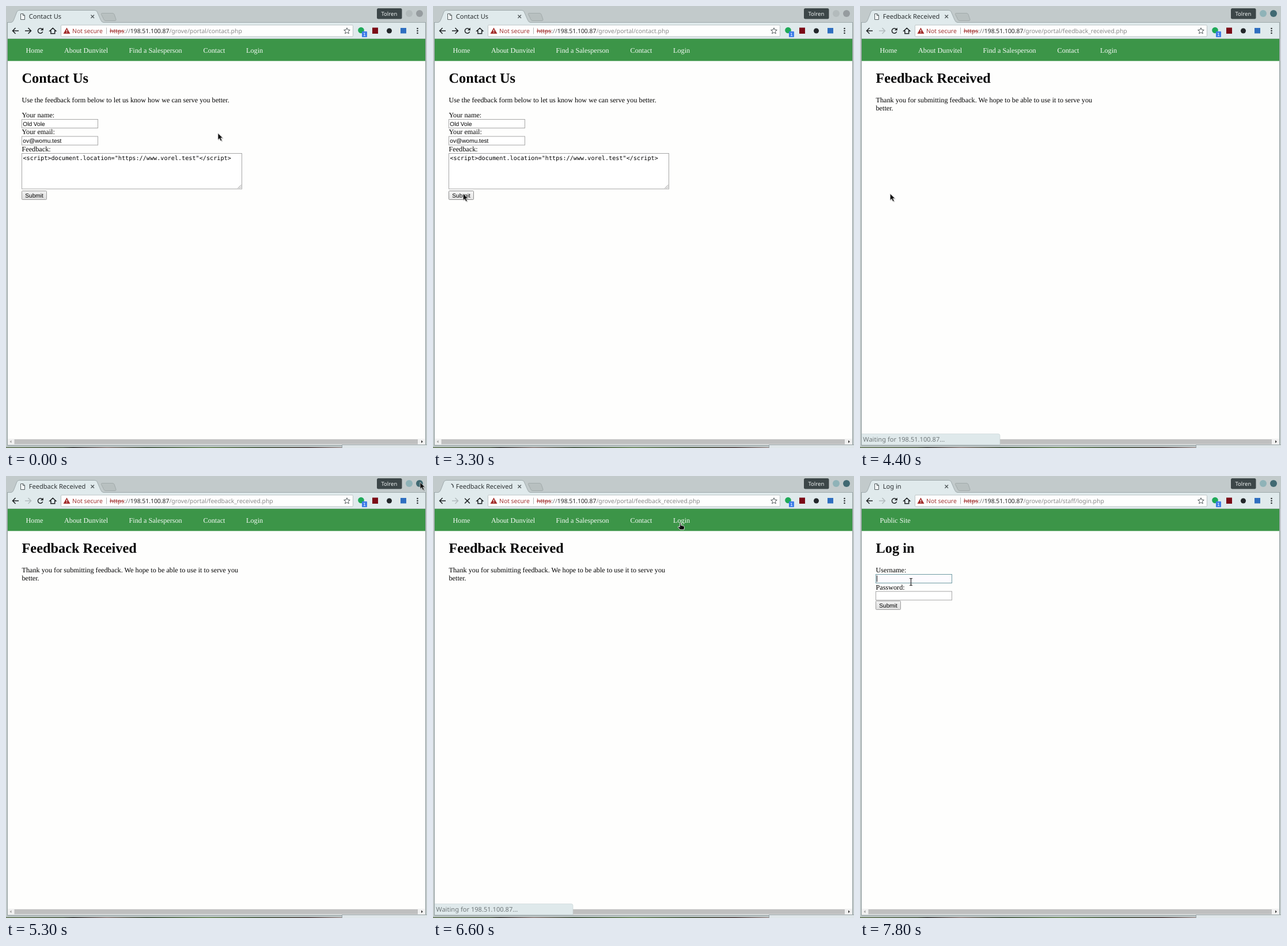
An HTML page for the animation above (8 s loop, 731 by 766 pixels).

```html
<!DOCTYPE html>
<html lang="en">
<head>
<meta charset="utf-8">
<title>Contact form</title>
<style>
  html, body { margin: 0; width: 100%; height: 100%; overflow: hidden; background: #fefefd; }
  svg { display: block; width: 100%; height: 100%; }
  text { white-space: pre; text-rendering: geometricPrecision; }
  .ui { font: 11.1px "Noto Sans", sans-serif; fill: #2b3032; }
  .bar { font-size: 10.38px; }
  .serif { font: 12.21px "Liberation Serif", serif; fill: #000; }
  .nav { fill: #f6faf6; }
  .h1 { font-size: 24.33px; font-weight: bold; }
  .field { font: 10.14px "Liberation Sans", sans-serif; fill: #000; }
  .mono { font: 10.19px "DejaVu Sans Mono", monospace; fill: #000; }
  .box { fill: #fff; stroke: #a6a6a6; }
  .btn { fill: url(#face); stroke: #9c9c9c; }
  .btn.hover { fill: url(#lit); stroke: #8c8c8c; }
  .btn.press { fill: #d8d8d8; }
  .line { fill: none; stroke: #1c2022; stroke-width: 1.5; }
</style>
</head>
<body>
<svg viewBox="0 0 731 766" preserveAspectRatio="none">
  <defs>
    <linearGradient id="face" x2="0" y2="1"><stop stop-color="#f1f1f1"/><stop offset="1" stop-color="#dedede"/></linearGradient>
    <linearGradient id="lit" x2="0" y2="1"><stop stop-color="#f7f7f7"/><stop offset="1" stop-color="#e4e4e4"/></linearGradient>
    <linearGradient id="desk">
      <stop stop-color="#5f7350"/><stop offset=".17" stop-color="#4a5a3e"/><stop offset=".2" stop-color="#2a2a25"/>
      <stop offset=".3" stop-color="#8c7a76"/><stop offset=".42" stop-color="#35482f"/><stop offset=".6" stop-color="#5f7f4a"/>
      <stop offset=".75" stop-color="#3c5032"/><stop offset=".9" stop-color="#4a3a38"/><stop offset="1" stop-color="#a39694"/>
    </linearGradient>
  </defs>

  <!-- window frame -->
  <rect width="731" height="766" fill="#c2cacb"/>
  <path d="M3 28.500H9Q12 28 13.500 24L19 10Q20.500 7.500 23 7.500H154Q157 7.500 158.200 10L164.500 24.500Q166 28 169 28.500H728V57H3Z" fill="#e0eaec"/>
  <path d="M2 28.500H9Q12 28 13.500 24L19 10Q20.500 7.500 23 7.500H154Q157 7.500 158.200 10L164.500 24.500Q166 28 169 28.500H729" fill="none" stroke="#a0abad"/>
  <path d="M166.500 12.500H185Q187 12.500 188 14.500L191 23Q191.500 25.500 189 25.500H173Q171 25.500 170 23.500L165.500 14.500Q165 12.500 166.500 12.500Z" fill="#b8c0c0" stroke="#a2abab"/>
  <path d="M147.500 15.500l5.500 5.500m0-5.500l-5.500 5.500" fill="none" stroke="#50585a" stroke-width="1.300"/>
  <rect x="644" y="4" width="43.500" height="18.500" rx="2.500" fill="#3c4648"/>
  <text class="ui" x="651.500" y="17" style="font-size:9.5px;fill:#eef2f2">Tolren</text>
  <circle id="min" cx="700" cy="13" r="6"/>
  <circle id="close" cx="718" cy="13" r="6"/>

  <!-- tab -->
  <path id="file" d="M25.500 13.500h4.500l2.500 2.500v7.500h-7zM29.500 13.500v3h3" fill="#f4f8f8" stroke="#555d5f"/>
  <path id="spin" d="M24.800 18.500A5.200 5.200 0 0 1 30 13.300" fill="none" stroke="#3a4144" stroke-width="1.400"/>
  <text class="ui" id="tab" x="39.700" y="22"></text>

  <!-- toolbar -->
  <path class="line" d="M22 43H12M16.500 38L11.500 43L16.500 48"/>
  <path class="line" id="fwd" d="M33 43H43M38.500 38L43.500 43L38.500 48"/>
  <g id="reload">
    <path class="line" d="M63 40.200A4.300 4.300 0 1 0 63.700 44.500"/>
    <path d="M64.800 37.500V42.300H60Z" fill="#1c2022"/>
  </g>
  <path class="line" id="stop" d="M55.200 38.800l8.600 8.600m0-8.600l-8.600 8.600"/>
  <path class="line" d="M76 43.300L81.300 38.300L86.600 43.300H84.700V47.700H77.900V43.300Z"/>
  <rect x="95.500" y="33" width="507" height="20" rx="1.500" fill="#fefefe" stroke="#bbc4c5"/>
  <path d="M105.500 37.500L111.500 48H99.500Z" fill="#a32e2b"/>
  <path d="M105.500 41v3.200m0 1.100v1.300" fill="none" stroke="#fff" stroke-width="1.200"/>
  <text class="ui bar" x="115" y="47" style="fill:#a33431">Not secure</text>
  <path d="M174.500 37.500V48.500" stroke="#b4b4b4"/>
  <text class="ui bar" x="180" y="47"><tspan style="fill:#a33431;text-decoration:line-through">https</tspan><tspan style="fill:#777">://</tspan><tspan style="fill:#222">198.51.100.87</tspan><tspan id="path" style="fill:#8a8a8a"></tspan></text>
  <path d="M592 37.800l1.500 3.500 3.800.3-2.900 2.500.9 3.700-3.300-2-3.300 2 .9-3.700-2.900-2.500 3.800-.3z" fill="none" stroke="#50585a"/>
  <circle cx="616.500" cy="42" r="5.300" fill="#1faa59"/>
  <rect x="618" y="44" width="9" height="10" rx="1" fill="#3f7de8"/>
  <text class="field" x="622.500" y="52" text-anchor="middle" style="font-size:8px;fill:#fff">1</text>
  <rect x="636" y="37.500" width="10" height="10.500" fill="#7c0b16"/>
  <circle cx="665.500" cy="43" r="4.500" fill="#22272a"/>
  <rect x="685" y="38" width="10" height="9.500" fill="#2f6fc0"/>
  <g fill="#2a2f31"><circle cx="714.500" cy="39" r="1.300"/><circle cx="714.500" cy="43" r="1.300"/><circle cx="714.500" cy="47" r="1.300"/></g>

  <!-- page -->
  <rect x="3" y="57" width="725" height="704" fill="#fefefd"/>
  <path d="M3 56.500H728" stroke="#b9c6c4"/>
  <rect x="3" y="57" width="725" height="38.300" fill="#3c9548"/>
  <g id="pages"></g>

  <!-- scrollbar and lower edge -->
  <rect x="3" y="750" width="725" height="10.500" fill="#f1f1f1"/>
  <rect x="14.500" y="751" width="700.500" height="8.500" fill="#bfbfbf"/>
  <path d="M9.500 752.500V757.500L6.500 755Z" fill="#a3a3a3"/>
  <path d="M721 752.500V757.500L724 755Z" fill="#404040"/>
  <g id="bubble">
    <path d="M2.500 761V741.500H240Q243 741.500 243 744.500V761Z" fill="#dfe9eb" stroke="#c6d0d2" stroke-width=".6"/>
    <text class="ui" id="status" x="5.300" y="755.300" style="fill:#70787a"></text>
  </g>
  <rect y="760.500" width="731" height="4" fill="#c0c9ca"/>
  <path d="M2.500 28V761.500H728.500V28" fill="none" stroke="#919d9f"/>
  <rect y="764.500" width="583" height="1.500" fill="url(#desk)"/>
  <rect x="583" y="760.500" width="148" height="5.500" fill="#dfe6e9"/>
  <path d="M583.500 766V760.500H731" fill="none" stroke="#98a4a7"/>

  <!-- pointers, hot spot at 0,0 -->
  <g id="arrow">
    <path d="M1 1V13L4 10.500L6 15L8.500 14L6.500 9.500H10Z" fill="#000" opacity=".18"/>
    <path d="M0 0V11.500L2.700 9L4.700 13.500L6.900 12.500L4.900 8.200H8.500Z" fill="#111" stroke="#e8e8e8" stroke-width=".7"/>
  </g>
  <path id="hand" d="M-1 .5Q0-.8 1 .5V4L5.500 5Q7 5.500 7 7L6.500 11.500H-.5L-4 7.500Q-4 5.500-2.500 6L-1 7Z" fill="#0a0a0a" stroke="#f4f4f4" stroke-width=".9"/>
  <path id="beam" d="M-2.500-6H-1Q0-6 0-5Q0-6 1-6H2.500M0-5V5M-2.500 6H-1Q0 6 0 5Q0 6 1 6H2.500" fill="none" stroke="#222" stroke-width="1.200"/>
</svg>
<script>
const NS = 'http://www.w3.org/2000/svg';
const $ = id => document.getElementById(id);
const show = (el, on) => { el.style.display = on ? '' : 'none'; };

function add(parent, tag, attrs, str) {
  const el = document.createElementNS(NS, tag);
  for (const k in attrs) el.setAttribute(k, attrs[k]);
  if (str) el.textContent = str;
  parent.append(el);
  return el;
}
const type = (g, cls, x, y, str) => add(g, 'text', { class: cls, x, y }, str);
const box = (g, cls, y, width = 132, height = 15) =>
  add(g, 'rect', { class: cls, x: 27.5, y, width, height });

function button(g, y) {
  const el = box(g, 'btn', y, 43);
  el.setAttribute('rx', 1);
  type(g, 'field', 33.3, y + 11.2, 'Submit');
  return el;
}

const root = '/grove/portal/';
const host = '198.51.100.87';
const info = [
  ['Contact Us', 'contact.php'],
  ['Feedback Received', 'feedback_received.php'],
  ['Log in', 'staff/login.php']
];
const menu = [[34.5, 'Home'], [101, 'About Dunvitel'], [213.5, 'Find a Salesperson'], [342.5, 'Contact'], [417, 'Login']];
const pages = info.map(([title], i) => {
  const g = add($('pages'), 'g', {});
  const items = i < 2 ? menu : [[34.5, 'Public Site']];
  items.forEach(([x, s]) => type(g, 'serif nav', x, 81, s));
  type(g, 'serif h1', 27.5, 132.8, title);
  return g;
});
const label = (i, y, s) => type(pages[i], 'serif', 27.5, y, s);

label(0, 167, 'Use the feedback form below to let us know how we can serve you better.');
label(0, 192.6, 'Your name:');
box(pages[0], 'box', 196.5);
type(pages[0], 'field', 29.3, 207.6, 'Old Vole');
label(0, 222.2, 'Your email:');
box(pages[0], 'box', 226);
type(pages[0], 'field', 29.3, 237.2, 'ov@womu.test');
label(0, 252, 'Feedback:');
box(pages[0], 'box', 255.5, 382, 61.5);
type(pages[0], 'mono', 29.5, 267, '<script>document.location="https://www.vorel.test"<\/script>');
add(pages[0], 'path', { d: 'M402.500 316L408.500 310M405.500 316L408.500 313', stroke: '#777', 'stroke-width': .8 });
const submit = button(pages[0], 320.5);

label(1, 167, 'Thank you for submitting feedback. We hope to be able to use it to serve you');
label(1, 180.5, 'better.');

label(2, 167, 'Username:');
const user = box(pages[2], 'box', 170.5);
const caret = add(pages[2], 'path', { d: 'M29.500 172.500V183.500', stroke: '#111' });
label(2, 196.7, 'Password:');
box(pages[2], 'box', 200);
button(pages[2], 216.5);

const waiting = 'Waiting for ' + host + '...';
const link = host + root + 'staff/index.php';
const at = (x, y, more) => ({ kind: 'arrow', x, y, ...more });

// Each step changes only the listed parts of the state.
const steps = [
  [0, at(368, 220.5, { page: 0, btn: '', live: false, load: false, bubble: 0, msg: waiting, focus: false })],
  [800, at(335, 234)],
  [900, at(205, 281)],
  [1000, at(98, 311)],
  [1100, at(58.5, 317)],
  [1300, at(57, 322, { btn: 'hover' })],
  [1400, at(55, 325)],
  [1500, at(54, 326.2)],
  [3300, at(52.3, 325.2)],
  [3600, { btn: 'hover press', live: true }],
  [3700, { btn: 'hover', load: true }],
  [3800, {}], [3900, {}], [4000, {}], [4100, {}],
  [4200, { page: 1, bubble: .3 }],
  [4300, { bubble: .7 }],
  [4400, { bubble: 1, load: false }],
  [4800, at(190, 302, { bubble: .7 })],
  [4900, at(470, 264, { bubble: .4 })],
  [5000, at(713, 235.5, { bubble: .15 })],
  [5100, { kind: '', bubble: 0 }],
  [5300, at(719, 11)],
  [5400, at(635, 50)],
  [5500, at(520, 76)],
  [5600, at(449.5, 82)],
  [5800, at(441, 82)],
  [5900, { kind: 'hand', x: 432, y: 81.5, msg: link, bubble: .15 }],
  [6000, { x: 429.5, bubble: .4 }],
  [6100, { bubble: 1 }],
  [6300, { load: true }],
  [6500, { msg: waiting }],
  [6600, {}],
  [6700, at(429, 81.5, { page: 2 })],
  [6800, {}],
  [7000, at(389.5, 113.3, { load: false })],
  [7100, at(245, 152, { bubble: .6 })],
  [7200, at(128, 188, { bubble: .3 })],
  [7300, { kind: 'beam', x: 92, y: 184, bubble: 0 }],
  [7500, { x: 90, y: 183.5 }],
  [7600, { x: 88.5, y: 183.5 }],
  [7800, { focus: true }]
];

function draw(now) {
  const t = now % 8000;
  const s = {};
  let last = 0;
  for (const [time, change] of steps) {
    if (time > t) break;
    Object.assign(s, change);
    last = time;
  }
  pages.forEach((g, i) => show(g, i === s.page));
  $('tab').textContent = info[s.page][0];
  $('path').textContent = root + info[s.page][1];
  $('fwd').style.stroke = s.page ? '#b3bcbe' : '';
  $('min').setAttribute('fill', s.live ? '#8fb3b8' : '#b3bbbc');
  $('close').setAttribute('fill', s.live ? '#416972' : '#969c9f');
  show($('file'), !s.load);
  show($('reload'), !s.load);
  show($('spin'), s.load);
  show($('stop'), s.load);
  $('spin').setAttribute('transform', `rotate(${(3900 - last) * .36} 30 18.5)`);
  submit.setAttribute('class', 'btn ' + s.btn);
  $('bubble').style.opacity = s.bubble;
  $('status').textContent = s.msg;
  user.style.stroke = s.focus ? '#6f9ba3' : '';
  user.style.fill = s.focus ? '#fdfbff' : '';
  show(caret, s.focus);
  for (const id of ['arrow', 'hand', 'beam']) {
    show($(id), id === s.kind);
    $(id).setAttribute('transform', `translate(${s.x} ${s.y})`);
  }
}

function loop() {
  draw(performance.now());
  requestAnimationFrame(loop);
}
loop();
</script>
</body>
</html>
```
